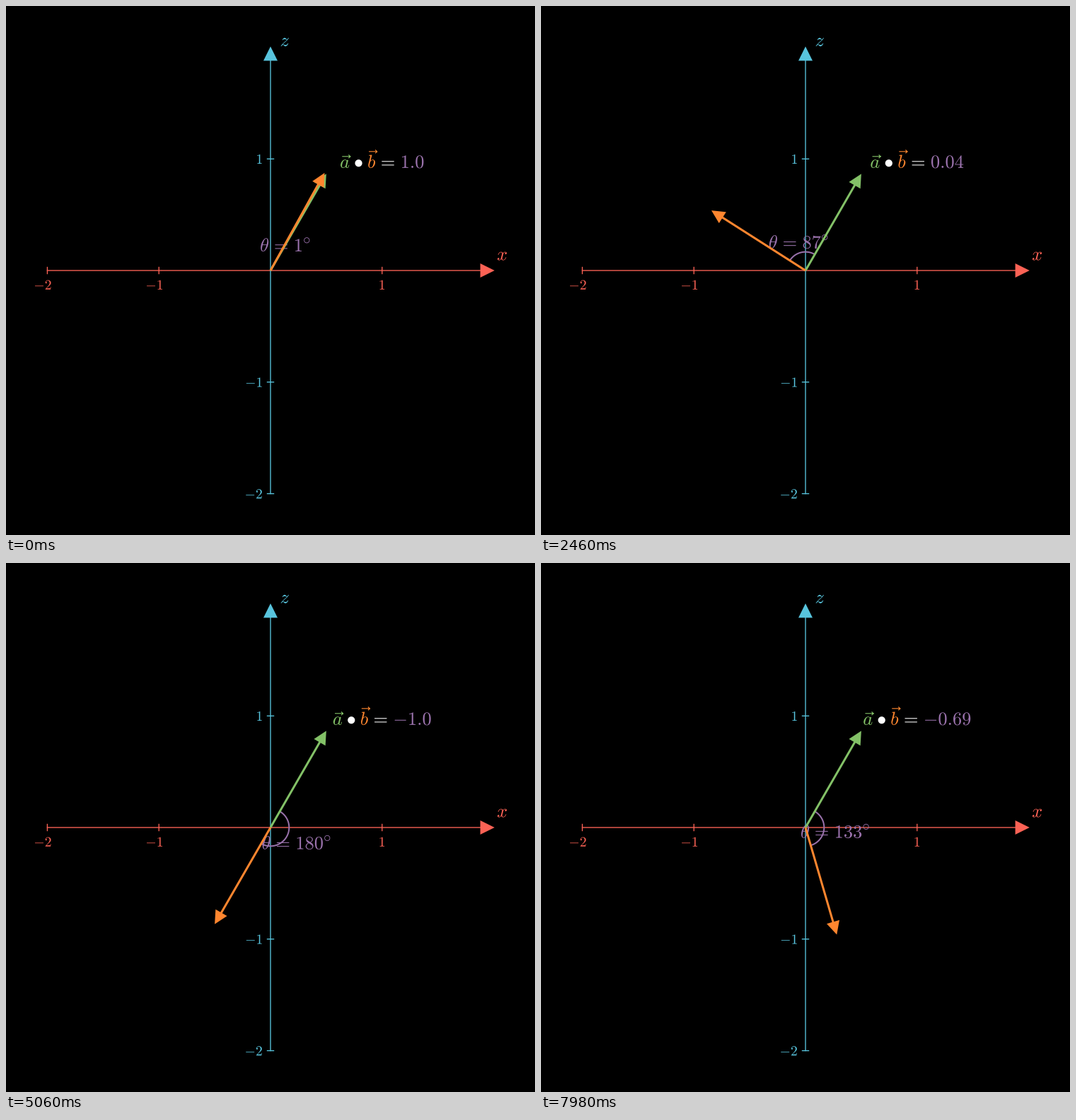
Animation of 748x748 px, one loop 8000 ms. Source, as a matplotlib script:

```python
import math

import numpy as np
import matplotlib.pyplot as plt
from matplotlib.animation import FuncAnimation
from matplotlib.patches import PathPatch, Polygon
from matplotlib.path import Path
from matplotlib.textpath import TextPath

plt.rcParams["mathtext.fontset"] = "cm"

SIZE, DPI, STEP, LOOP = 748, 100, 20, 8000
C, UNIT = 374.0, 157.78
EM, TICK_EM = 26.45, 19.8
PT = 72 / DPI
RED, BLUE, GREEN = "#FC6255", "#58C4DD", "#83C167"
ORANGE, PURPLE, WHITE = "#FF862F", "#9A72AC", "#FFFFFF"
A_DEG, TIP, ARC_R, LABEL_R = 60, 18.7, 26.3, 42.1

fig = plt.figure(figsize=(SIZE / DPI, SIZE / DPI), dpi=DPI, facecolor="black")
ax = fig.add_axes([0, 0, 1, 1])
ax.set_xlim(0, SIZE)
ax.set_ylim(SIZE, 0)
ax.axis("off")

cache = {}


def glyphs(tex):
    """Outline of a formula at 1 em, baseline at y = 0."""
    if tex not in cache:
        p = TextPath((0, 0), f"${tex}$", size=1)
        cache[tex] = Path(p.vertices, p.codes)
    return cache[tex]


def place(tex, x, y, em=EM, op=False):
    """Path with its origin at (x, y); operators lose their padding."""
    p = glyphs(tex)
    dx = 0.056 - p.get_extents().x0 if op else 0
    return Path((p.vertices + [dx, 0]) * [em, -em] + [x, y], p.codes)


def add_path(color, z, path=None, width=0):
    style = dict(fc="none", ec=color, lw=width * PT) if width else dict(fc=color, lw=0)
    patch = PathPatch(path or Path([(0, 0), (0, 0)]), zorder=z, **style)
    return ax.add_patch(patch)


def static_text(tex, x, y, em, color, align=0.5):
    box = glyphs(tex).get_extents()
    ox = x - (box.x0 + align * box.width) * em
    oy = y + (box.y0 + box.height / 2) * em
    add_path(color, 2, place(tex, ox, oy, em))


def line(x, y, color, width, z):
    return ax.plot(x, y, color=color, lw=width * PT, zorder=z,
                   solid_capstyle="butt", snap=False)[0]


def direction(deg):
    a = math.radians(deg)
    return np.array([math.cos(a), -math.sin(a)])


class Vector:
    def __init__(self, color, z):
        self.shaft = line([], [], color, 3, z)
        self.head = ax.add_patch(Polygon([(0, 0)] * 3, fc=color, lw=0, zorder=z))

    def point(self, deg):
        u = direction(deg)
        side = np.array([-u[1], u[0]]) * TIP / 2
        end = C + u * UNIT
        base = end - u * TIP
        neck = base + u
        self.shaft.set_data([C, neck[0]], [C, neck[1]])
        self.head.set_xy([end, base + side, base - side])


def accent(x, y):
    """Small arrow above a letter."""
    tip, back, rise = x + 0.45 * EM, 0.1 * EM, 0.095 * EM
    v = [(x, y), (tip, y)]
    codes = [Path.MOVETO, Path.LINETO]
    for s in (-1, 1):
        v += [(tip - back, y + s * rise), (tip - 0.6 * back, y + s * 0.2 * rise), (tip, y)]
        codes += [Path.MOVETO, Path.CURVE3, Path.CURVE3]
    return Path(v, codes)


# Axes
lo = C - 2 * UNIT
line([lo - 0.7, 672], [C, C], RED, 1.35, 1)
line([C, C], [C + 2 * UNIT + 0.7, 76], BLUE, 1.35, 1)
for color, pts in ((RED, [(690.8, C), (670.6, C - 10), (670.6, C + 10)]),
                   (BLUE, [(C, 57.2), (C - 10, 77.4), (C + 10, 77.4)])):
    ax.add_patch(Polygon(pts, fc=color, lw=0, zorder=1))
for n in (-2, -1, 1):
    x, y = C + n * UNIT, C - n * UNIT
    line([x, x], [C - 5.2, C + 5.2], RED, 1.35, 1)
    line([C - 5.2, C + 5.2], [y, y], BLUE, 1.35, 1)
    static_text(str(n), x - (6.2 if n < 0 else 0), 394.2, TICK_EM, RED)
    static_text(str(n), 361.8, y + 0.2, TICK_EM, BLUE, 1)
static_text("x", 701.5, 353.6, EM, RED)
static_text("z", 394.3, 51, EM, BLUE)

# Moving parts
label = [add_path(PURPLE, 3) for _ in range(4)]
arc = line([], [], PURPLE, 2, 4)
vec_a, vec_b = Vector(GREEN, 5), Vector(ORANGE, 6)
vec_a.point(A_DEG)
letter_a, letter_b = add_path(GREEN, 7), add_path(ORANGE, 7)
hat_a, hat_b = add_path(GREEN, 7, width=1.1), add_path(ORANGE, 7, width=1.1)
dot, equals = add_path(WHITE, 7), add_path(WHITE, 7)
number = add_path(PURPLE, 7)


def smooth(t):
    def sig(v):
        return 1 / (1 + math.exp(-v))
    edge = sig(-5)
    t = min(max(t, 0), 1)
    return min(max((sig(10 * (t - 0.5)) - edge) / (1 - 2 * edge), 0), 1)


def swing(ms):
    """Degrees from a to b, counter-clockwise."""
    return 1 + 179 * smooth((ms + 6.5) / 5000) + 185 * smooth((ms - 6020) / 5000)


def show_product(value):
    text = str(round(value, 2))
    right = 3.236 + glyphs(text).get_extents().x1
    x = C + UNIT - EM * (0.04 + right) / 2
    y = 229.0
    letter_a.set_path(place("a", x, y))
    hat_a.set_path(accent(x + 0.12 * EM, y - 0.615 * EM))
    dot.set_path(place(r"\bullet", x + 0.751 * EM, y, op=True))
    letter_b.set_path(place("b", x + 1.473 * EM, y))
    hat_b.set_path(accent(x + 1.55 * EM, y - 0.878 * EM))
    equals.set_path(place("=", x + 2.18 * EM, y, op=True))
    number.set_path(place(text, x + 3.236 * EM, y))


def show_angle(theta, mid):
    text = str(int(theta + 1e-6))
    sup = 1.803 + 0.5 * len(text)
    cx, cy = C + direction(mid) * LABEL_R
    x = cx - EM * (0.035 + sup + 0.355) / 2
    y = cy + 0.365 * EM
    paths = (place(r"\theta", x, y),
             place("=", x + 0.747 * EM, y, op=True),
             place(text, x + 1.803 * EM, y),
             place(r"\circ", x + sup * EM, y - 0.39 * EM, 0.8 * EM, op=True))
    for patch, path in zip(label, paths):
        patch.set_path(path)


def draw(i):
    d = swing(i * STEP)
    start, stop, theta = A_DEG, A_DEG + d, d
    if d >= 180 - 1e-9:
        start, stop, theta = A_DEG + d, A_DEG + 360, 360 - d
    vec_b.point(A_DEG + d)
    a = np.radians(np.linspace(start, stop, 60))
    arc.set_data(C + ARC_R * np.cos(a), C - ARC_R * np.sin(a))
    show_angle(theta, (start + stop) / 2)
    show_product(math.cos(math.radians(d)))
    return []


anim = FuncAnimation(fig, draw, frames=LOOP // STEP, interval=STEP,
                     init_func=lambda: draw(0), repeat=True, repeat_delay=0,
                     blit=False, cache_frame_data=False)
plt.show()
```
